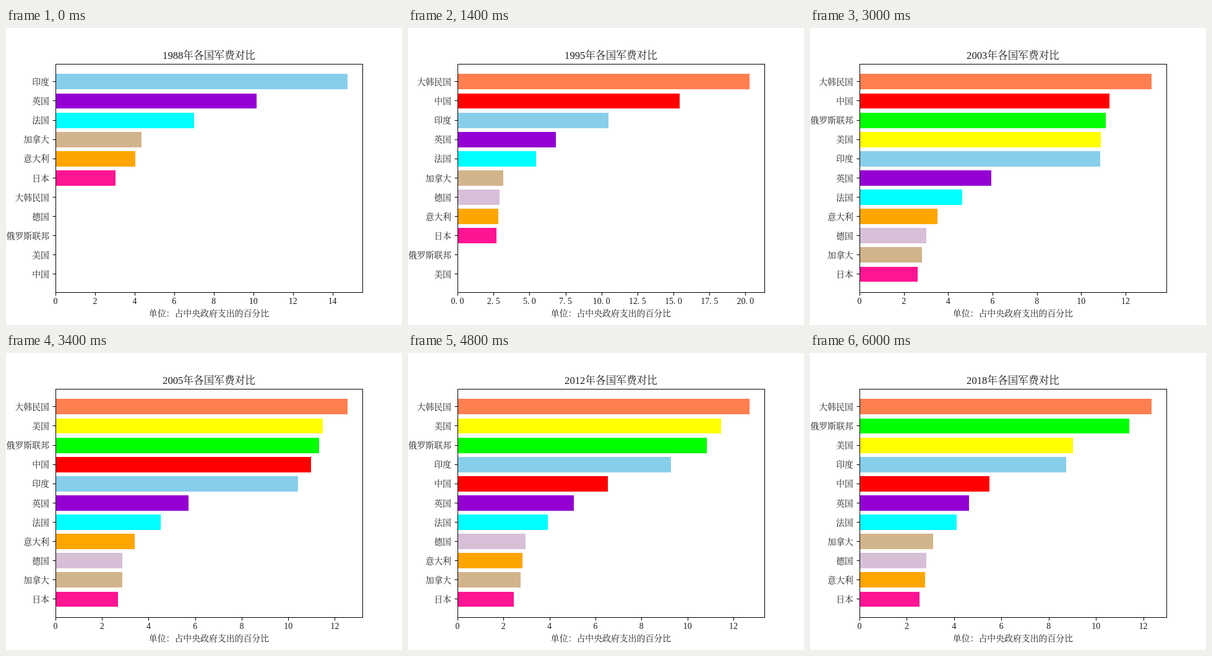
These frames come from a looping animation (640 px wide and 480 px high, 6.2 s). An HTML page:

```html
<!DOCTYPE html>
<html lang="zh-CN">
<head>
<meta charset="utf-8">
<style>
  html, body { margin: 0; width: 100%; height: 100%; overflow: hidden; background: #fff; }
  svg { display: block; width: 640px; height: 480px; }
  text {
    font: 300 13.89px "Liberation Serif", "Noto Serif CJK SC", "Noto Sans CJK SC", "Noto Sans CJK", serif;
    fill: #1c1c1c;
  }
  .title { font-size: 16.67px; }
  .mid { text-anchor: middle; }
  .end { text-anchor: end; }
  .line { fill: none; stroke: #000; stroke-width: 1; }
</style>
</head>
<body>
<svg viewBox="0 0 640 480">
  <text id="title" class="title mid" x="328" y="50"></text>
  <g id="rows"></g>
  <g id="ticks"></g>
  <rect class="line" x="80.5" y="58.5" width="496" height="369"/>
  <text class="mid" x="328" y="466.3">单位：占中央政府支出的百分比</text>
</svg>
<script>
const FIRST = 1988, YEARS = 31, STEP_MS = 200;
const LEFT = 80, WIDTH = 496, TOP = 57.6, HEIGHT = 369.6;
const PITCH = HEIGHT / 11.88, BAR = PITCH * 0.8;
const KEYS = [1988, 1995, 2000, 2005, 2009, 2012, 2018];
const KOREA_KEYS = [1990, 1995, 1996, 1997, 1998, 1999, 2000, 2002, 2005, 2007, 2009, 2012, 2016, 2018];

// name, colour, first year with data, values at the last keys, own keys
const countries = [
  ['中国', 'red', 1990, [15.43, 11.69, 10.98, 8.1, 6.54, 5.5]],
  ['美国', 'yellow', 2001, [10, 11.48, 11.26, 11.45, 9.03]],
  ['俄罗斯联邦', 'lime', 1999, [10.81, 11.32, 10.18, 10.84, 11.41]],
  ['德国', 'thistle', 1991, [2.92, 3.23, 2.88, 2.92, 2.96, 2.83]],
  ['大韩民国', 'coral', 1990,
    [24.3, 20.3, 18.9, 17.9, 16.4, 15, 14.42, 13.5, 12.557, 12.15, 12.79, 12.71, 11.88, 12.36], KOREA_KEYS],
  ['日本', 'deeppink', FIRST, [3.03, 2.71, 2.53, 2.68, 2.49, 2.45, 2.54]],
  ['意大利', 'orange', FIRST, [4.04, 2.84, 3.72, 3.4, 3.03, 2.82, 2.77]],
  ['加拿大', 'tan', FIRST, [4.35, 3.18, 2.75, 2.87, 3.17, 2.74, 3.12]],
  ['法国', 'cyan', FIRST, [7.01, 5.46, 4.79, 4.52, 4.36, 3.93, 4.11]],
  ['英国', 'darkviolet', FIRST, [10.17, 6.83, 6.32, 5.71, 5.5, 5.06, 4.63]],
  ['印度', 'skyblue', FIRST, [14.776, 10.49, 11.51, 10.42, 10.32, 9.28, 8.74]]
];

const byId = id => document.getElementById(id);

function valueAt([, , start, vals, keys = KEYS], year) {
  if (year < start) return 0;
  const ks = keys.slice(-vals.length);
  const i = ks.findIndex(k => k >= year);
  if (i === 0) return vals[0];
  const part = (year - ks[i - 1]) / (ks[i] - ks[i - 1]);
  return vals[i - 1] + (vals[i] - vals[i - 1]) * part;
}

function row({ name, color, value }, rank, limit) {
  const mid = TOP + HEIGHT - (0.94 + rank) * PITCH;
  const top = Math.round(mid - BAR / 2), bottom = Math.round(mid + BAR / 2);
  const width = Math.round(value / limit * WIDTH);
  return `<rect x="${LEFT}" y="${top}" width="${width}" height="${bottom - top}" fill="${color}"/>
    <path class="line" d="M75.5 ${Math.floor(mid) + 0.5}H80"/>
    <text class="end" x="70" y="${mid + 5.2}">${name}</text>`;
}

function axis(limit) {
  const step = [1, 2, 2.5, 5].find(s => s >= limit / 9);
  let out = '';
  for (let v = 0; v <= limit; v += step) {
    const x = LEFT + v / limit * WIDTH;
    // a space after the point keeps every glyph half an em wide
    const label = step === 2.5 ? v.toFixed(1).replace('.', '. ') : v;
    out += `<path class="line" d="M${Math.round(x) + 0.5} 428V432.5"/>
      <text class="mid" x="${x}" y="446">${label}</text>`;
  }
  return out;
}

function draw(year) {
  const data = countries
    .map(c => ({ name: c[0], color: c[1], value: valueAt(c, year) }))
    .sort((a, b) => a.value - b.value);
  const limit = data[data.length - 1].value * 1.05;
  byId('title').textContent = year + '年各国军费对比';
  byId('rows').innerHTML = data.map((d, i) => row(d, i, limit)).join('');
  byId('ticks').innerHTML = axis(limit);
}

const start = performance.now();
let shown;
function tick() {
  const year = FIRST + Math.floor((performance.now() - start) / STEP_MS) % YEARS;
  if (year !== shown) draw(shown = year);
  requestAnimationFrame(tick);
}
tick();
</script>
</body>
</html>
```
